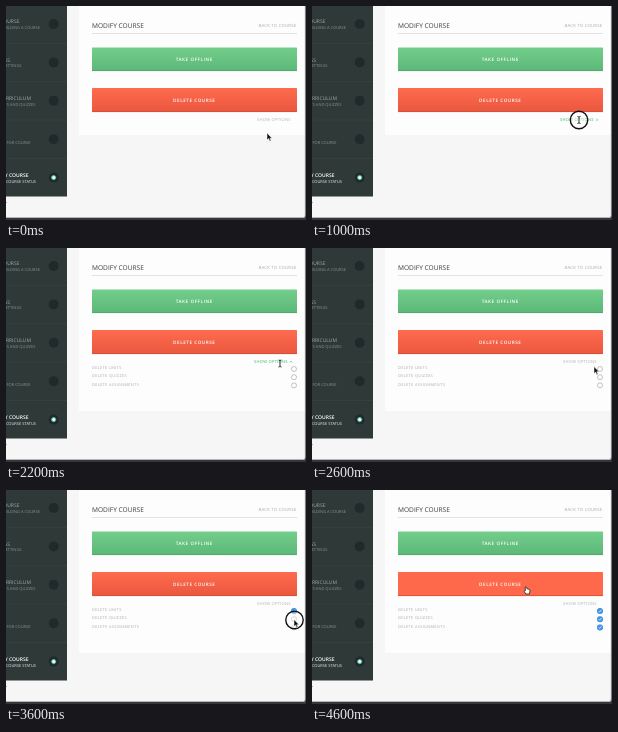
These frames come from a looping animation (300x214 px, 4800 ms). An HTML page:

```html
<!DOCTYPE html>
<html lang="en">
<head>
<meta charset="utf-8">
<title>Modify course</title>
<style>
html, body { margin: 0; width: 100%; height: 100%; overflow: hidden; background: #f7f7f7; }
svg { display: block; width: 300px; height: 214px; }
text { font-family: "Open Sans", "Noto Sans", sans-serif; text-rendering: geometricPrecision; }
.end { text-anchor: end; }
.label { font-size: 4.6px; font-weight: 600; letter-spacing: .55px; fill: #fff; text-anchor: middle; }
.option { font-size: 3.9px; letter-spacing: .34px; fill: #aaa; }
#toggle { font-size: 4.1px; letter-spacing: .25px; }
</style>
</head>
<body>
<svg viewBox="0 0 300 214">
  <defs>
    <linearGradient id="green" x2="0" y2="1"><stop stop-color="#73ce8b"/><stop offset="1" stop-color="#5cb878"/></linearGradient>
    <linearGradient id="red" x2="0" y2="1"><stop stop-color="#ff6b4e"/><stop offset="1" stop-color="#e9573f"/></linearGradient>
  </defs>
  <rect width="300" height="214" fill="#f6f6f6"/>
  <rect id="panel" x="73" width="226" fill="#fdfdfd"/>
  <rect width="61" height="190.5" fill="#2e3938"/>
  <g id="menu"></g>
  <text x="86" y="22" font-size="6.6" fill="#3c3c3c" font-weight="500">MODIFY COURSE</text>
  <text x="252.5" y="21" font-size="4.3" letter-spacing=".2" fill="#aaa">BACK TO COURSE</text>
  <path d="M86 27.5H291" stroke="#ddd" stroke-width=".8"/>
  <rect x="86" y="41.5" width="205" height="23.5" rx=".7" fill="url(#green)"/>
  <path d="M86 64.6H291" stroke="#50a469" stroke-width=".8"/>
  <text class="label" x="188.3" y="55">TAKE OFFLINE</text>
  <rect id="delete" x="86" y="82" width="205" height="24" rx=".7"/>
  <path d="M86 105.6H291" stroke="#d24c37" stroke-width=".8"/>
  <text class="label" x="188.3" y="95.7">DELETE COURSE</text>
  <text id="toggle" y="115.2">SHOW OPTIONS</text>
  <path id="caret" d="M-.6-1.2L.6 0L-.6 1.2" fill="none" stroke="#35b559" stroke-width=".7"/>
  <g id="options"></g>
  <path d="M299.3 0V209Q299.3 211.5 296.8 211.5H0" fill="none" stroke="#a5a5a5" stroke-width=".8"/>
  <path d="M300 0V214H0V212H297Q299.5 212 299.5 209V0Z" fill="#34383c"/>
  <rect y="196" width="1" height="1" fill="#aaa"/>
  <circle id="ring" r="8.7" fill="#fff" fill-opacity=".35" stroke="#111" stroke-width="1.4"/>
  <g id="cursor">
    <path id="arrow" d="M0 0V7L1.6 5.6L2.8 8.2L4 7.6L2.8 5.2H5Z" fill="#111" stroke="#fff" stroke-width=".5"/>
    <path id="beam" d="M-1.5-3.5Q0-3.5 0-2.5Q0-3.5 1.5-3.5M0-2.5V2.5M-1.5 3.5Q0 3.5 0 2.5Q0 3.5 1.5 3.5" fill="none" stroke="#222" stroke-width=".9"/>
    <path id="hand" d="M-1.8-3Q-1-3.8-.4-2.8L0-1.2L2-.8Q3.2-.4 3 1L2.4 4H-1.2L-3 1.2Q-3 .2-1.6.7Z" fill="#fff" stroke="#222" stroke-width=".8"/>
  </g>
</svg>
<script>
const $ = id => document.getElementById(id);
const STEP = 200, LOOP = 4800;

// right edge of title, title, right edge of subtitle, subtitle
const rows = [
  [13.5, 'COURSE', 34, 'BUILDING A COURSE'],
  [4, 'SETTINGS', 15.5, 'COURSE SETTINGS'],
  [25, 'CURRICULUM', 29.5, 'UNITS AND QUIZZES'],
  [-2, 'PRICING', 24.5, 'PRICING FOR COURSE'],
  [22.5, 'MODIFY COURSE', 30, 'COURSE STATUS']
];
$('menu').innerHTML = rows.map(([tx, title, sx, sub], i) => {
  const y = 18 + i * 38.4, on = i === 4;
  return `<path d="M0 ${y + 19.3}H61" stroke="#43504e" stroke-width=".6" stroke-dasharray="1 1" opacity="${on ? 0 : 1}"/>
    <text class="end" x="${tx}" y="${y - .6}" font-size="5" font-weight="${on ? 600 : 400}" fill="${on ? '#fff' : '#a0a9a7'}">${title}</text>
    <text class="end" x="${sx}" y="${y + 5}" font-size="4" fill="${on ? '#f0f4f3' : '#8b9593'}">${sub}</text>
    <circle cx="47.7" cy="${y}" r="5" fill="#202a2b"/>` +
    (on ? `<circle cx="47.7" cy="${y}" r="2.1" fill="#e6fff5" stroke="#4fb09a" stroke-width="1"/>` : '');
}).join('');

$('options').innerHTML = ['UNITS', 'QUIZZES', 'ASSIGNMENTS'].map((name, i) => {
  const y = 121 + i * 8.2;
  return `<text class="option" x="86" y="${y + .2}">DELETE ${name}</text>
    <circle cx="288" cy="${y}" r="2.5" fill="#fff" stroke="#aaa" stroke-width=".7"/>
    <g class="check"><circle cx="288" cy="${y}" r="3" fill="#3d94e6"/>
    <path d="M286.6 ${y}L287.6 ${y + 1.1}L289.5 ${y - 1.2}" fill="none" stroke="#fff" stroke-width=".7"/></g>`;
}).join('');
const checks = document.querySelectorAll('.check');

// time, x, y of the pointer
const path = [
  [0, 261, 127], [200, 261.5, 125.5], [600, 267, 114], [2000, 267, 114], [2200, 274, 115.5],
  [2800, 286, 120], [3200, 286, 120], [3600, 288, 129.5], [3800, 288, 129.5],
  [4000, 287, 136], [4200, 287, 136], [4600, 215, 100]
];
const checkTimes = [3200, 3800, 4200];
const clicks = { 1000: [267, 114], 3000: [286.5, 120], 3600: [288.5, 130] };

function pointer(t) {
  const i = path.findIndex(p => p[0] >= t);
  if (i < 1) return path[0].slice(1);
  const [a, ax, ay] = path[i - 1], [b, bx, by] = path[i];
  const k = (t - a) / (b - a);
  return [ax + (bx - ax) * k, ay + (by - ay) * k];
}
const show = (el, on) => el.setAttribute('visibility', on ? 'visible' : 'hidden');

function draw(t) {
  const [x, y] = pointer(t);
  const hover = t >= 600 && t < 2400, onDelete = t >= 4600;
  const open = Math.min(1, Math.max(0, (t - 1000) / 400));
  $('panel').setAttribute('height', 129 + 34 * open);
  $('options').setAttribute('opacity', open);
  $('delete').setAttribute('fill', onDelete ? '#ff694b' : 'url(#red)');
  $('toggle').setAttribute('x', hover ? 248 : 251);
  $('toggle').setAttribute('fill', hover ? '#35b559' : '#b0b0b0');
  show($('caret'), hover);
  $('caret').setAttribute('transform', `translate(285 113.8) rotate(${-90 * open})`);
  checks.forEach((c, i) => show(c, t >= checkTimes[i]));
  const click = clicks[t];
  show($('ring'), click);
  if (click) $('ring').setAttribute('transform', `translate(${click})`);
  $('cursor').setAttribute('transform', `translate(${x} ${y})`);
  show($('beam'), hover);
  show($('hand'), onDelete);
  show($('arrow'), !hover && !onDelete);
}

const start = performance.now();
function tick() {
  const t = (performance.now() - start) % LOOP;
  draw(Math.floor(t / STEP) * STEP);
  requestAnimationFrame(tick);
}
tick();
</script>
</body>
</html>
```
